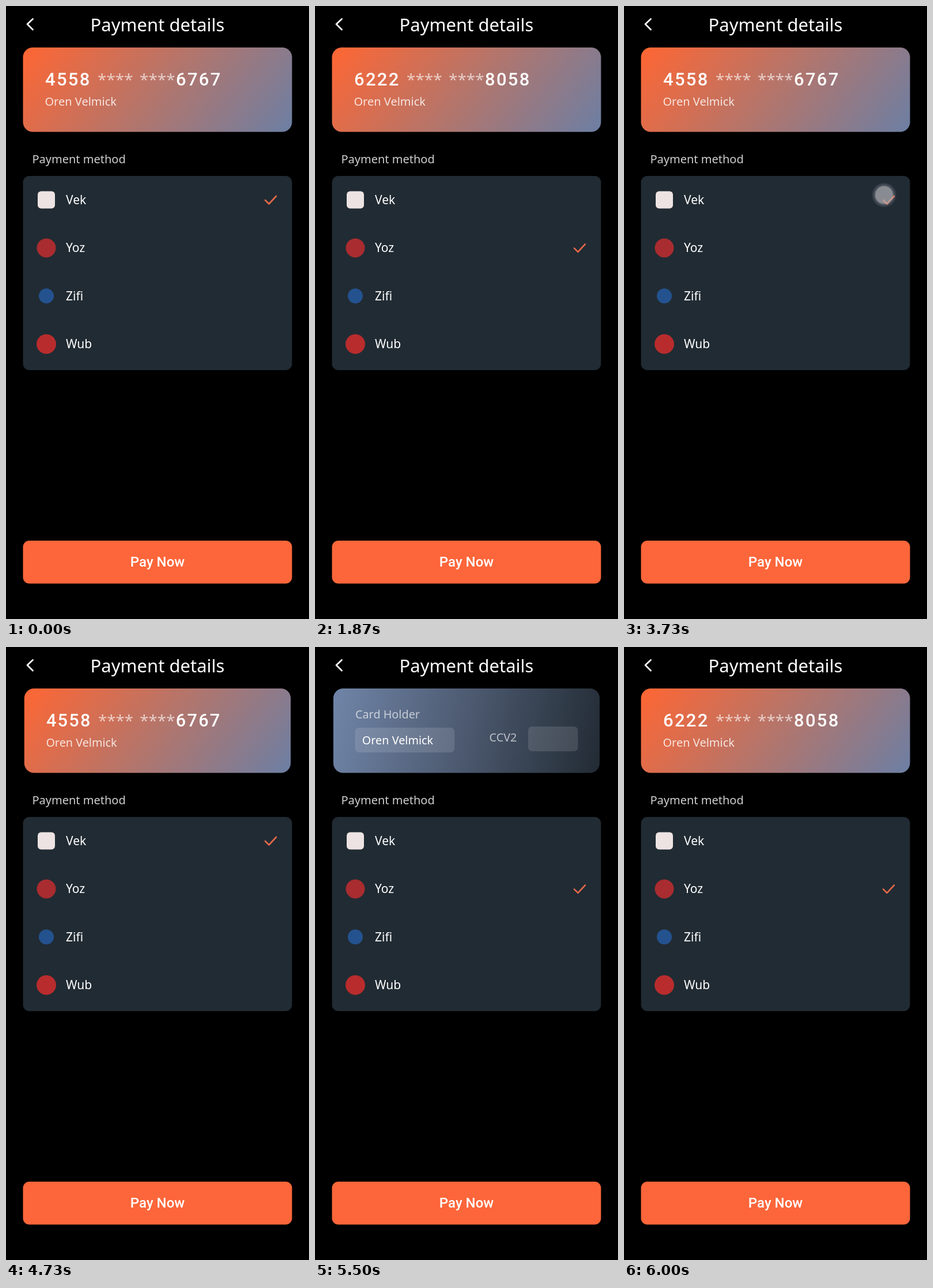
An HTML page with a canvas for the animation above (6030 ms loop, 526 px wide and 1064 px high).

```html
<!DOCTYPE html>
<html lang="en">
<head>
<meta charset="utf-8">
<title>Payment details</title>
<style>
  html, body { margin: 0; width: 100%; height: 100%; overflow: hidden; background: #000; }
  canvas { display: block; width: 526px; height: 1064px; }
</style>
</head>
<body>
<canvas id="stage" width="526" height="1064"></canvas>
<script>
const ctx = document.getElementById('stage').getContext('2d');
const LOOP = 6030;
const FLIP = 600;
const HOLDER = 'Oren Velmick';
const CARD = { x: 29.5, y: 72, w: 467, h: 146.5, mid: 263 };
const ROW_TOP = 336.5, ROW_STEP = 83.4;

const banks = [
  { name: 'Vek', color: '#ece3e2', size: 30, square: true, number: ['4558', '6767'] },
  { name: 'Yoz', color: '#a92c30', size: 33, number: ['6222', '8058'] },
  { name: 'Zifi', color: '#24528f', size: 26 },
  { name: 'Wub', color: '#b92c2d', size: 34 }
];

// Selected bank from each moment on
const selections = [[0, 0], [1800, 1], [3690, 0], [5419, 1]];
// Moments at which the card starts turning over
const flips = [4650, 5419];
const touches = [
  { from: 1640, to: 1860, x: 452, y: 412 },
  { from: 3550, to: 3770, x: 451.5, y: 328 },
  { from: 4490, to: 4690, x: 330, y: 150 },
  { from: 5240, to: 5460, x: 452, y: 412 }
];

const clamp = v => Math.max(0, Math.min(1, v));
const ease = v => (1 - Math.cos(Math.PI * clamp(v))) / 2;

function text(string, x, y, size, color = '#fff', { font = '"Noto Sans"', weight = 400, align = 'left', spacing = 0 } = {}) {
  ctx.font = `${weight} ${size}px ${font}, "Open Sans", sans-serif`;
  ctx.letterSpacing = spacing + 'px';
  ctx.textAlign = align;
  ctx.fillStyle = color;
  ctx.fillText(string, x, y);
}

function box(x, y, w, h, radius, fill) {
  ctx.beginPath();
  ctx.roundRect(x, y, w, h, radius);
  ctx.fillStyle = fill;
  ctx.fill();
}

function line(points, color, width) {
  ctx.beginPath();
  points.forEach(([x, y]) => ctx.lineTo(x, y));
  ctx.strokeStyle = color;
  ctx.lineWidth = width;
  ctx.lineCap = ctx.lineJoin = 'round';
  ctx.stroke();
}

function cardBase(angle, colors) {
  // The gradient reaches exactly from corner to corner
  const cos = Math.cos(angle), sin = Math.sin(angle);
  const reach = (CARD.w * cos + CARD.h * sin) / 2;
  const cy = CARD.y + CARD.h / 2;
  const fill = ctx.createLinearGradient(
    CARD.mid - cos * reach, cy - sin * reach, CARD.mid + cos * reach, cy + sin * reach);
  colors.forEach((color, i) => fill.addColorStop(i / (colors.length - 1), color));
  box(CARD.x, CARD.y, CARD.w, CARD.h, 17, fill);
}

function cardFront([head, tail]) {
  cardBase(0.68, ['#ff6633', '#b4756b', '#6c7fa4']);
  const digits = { font: 'Roboto', weight: 500, spacing: 2.3 };
  text(head, 68, 138, 31, '#fff', digits);
  text('****', 159, 138, 28, 'rgba(255,255,255,.65)');
  text('****', 232, 138, 28, 'rgba(255,255,255,.65)');
  text(tail, 295, 138, 31, '#fff', digits);
  text(HOLDER, 67.5, 173, 20, 'rgba(255,255,255,.82)');
}

function cardBack() {
  cardBase(0.2, ['#7085a8', '#4c596f', '#222b34']);
  const field = 'rgba(255,255,255,.12)';
  const label = 'rgba(255,255,255,.65)';
  text('Card Holder', 68, 124, 20, label);
  box(67.5, 140, 174.5, 43, 7, field);
  text(HOLDER, 80, 168.5, 20);
  text('CCV2', 303, 164, 20, label);
  box(371, 138, 87.5, 43, 7, field);
}

function drawCard(t, bank) {
  const turn = flips.reduce((sum, start) => sum + ease((t - start) / FLIP), 0);
  const width = Math.cos(turn * Math.PI);
  ctx.save();
  ctx.translate(CARD.mid, 0);
  ctx.scale(Math.max(Math.abs(width), 0.002), 1);
  ctx.translate(-CARD.mid, 0);
  if (width >= 0) cardFront(bank.number);
  else cardBack();
  ctx.restore();
}

function drawList(selected) {
  box(29.5, 295, 467, 337, 11, '#212b33');
  banks.forEach((bank, i) => {
    const y = ROW_TOP + i * ROW_STEP;
    const half = bank.size / 2;
    box(70 - half, y - half, bank.size, bank.size, bank.square ? 6 : half, bank.color);
    text(bank.name, 104, y + 7.5, 21);
    if (i === selected) line([[450, y + .5], [456.5, y + 7], [469, y - 6.5]], '#e5694b', 2.6);
  });
}

function drawTouch(t, { from, to, x, y }) {
  const alpha = clamp((t - from) / 60) * clamp((to - t) / 40);
  if (!alpha) return;
  ctx.save();
  ctx.globalAlpha = alpha;
  const glow = ctx.createRadialGradient(x, y, 14, x, y, 22);
  glow.addColorStop(0, 'rgba(200,200,220,.4)');
  glow.addColorStop(1, 'rgba(200,200,220,0)');
  box(x - 22, y - 22, 44, 44, 22, glow);
  box(x - 15.5, y - 15.5, 31, 31, 15.5, 'rgba(170,170,170,.55)');
  ctx.restore();
}

function draw(t) {
  const selected = selections.filter(([time]) => time <= t).pop()[1];
  ctx.fillStyle = '#000';
  ctx.fillRect(0, 0, 526, 1064);
  line([[46.5, 22.5], [37, 31.5], [46.5, 41]], '#fff', 2.7);
  text('Payment details', 263, 44, 31, '#fff', { align: 'center' });
  drawCard(t, banks[selected]);
  text('Payment method', 45.5, 273, 20, '#cfcfcf');
  drawList(selected);
  box(29.5, 928, 467, 74.5, 11, '#fc663a');
  text('Pay Now', 263, 973, 24, '#fff', { font: 'Roboto', align: 'center', weight: 500 });
  touches.forEach(touch => drawTouch(t, touch));
}

const started = performance.now();
function tick() {
  draw((performance.now() - started) % LOOP);
  requestAnimationFrame(tick);
}
tick();
</script>
</body>
</html>
```
